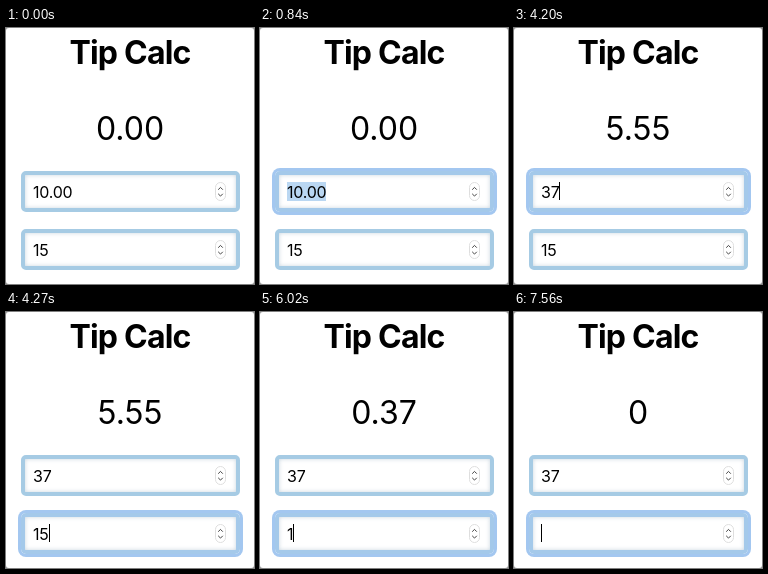
Recreate the animation shown at these times as an HTML page. Size 248 by 256 pixels, loop 8000 ms.

```html
<!DOCTYPE html>
<html lang="en">
<head>
<meta charset="utf-8">
<title>Tip Calc</title>
<style>
  html, body { margin: 0; width: 100%; height: 100%; overflow: hidden; background: #999; }
  main {
    position: relative; width: 248px; height: 256px; background: #fff; border-radius: 3px;
    font: 16px Inter, Roboto, sans-serif; font-optical-sizing: none; color: #000;
  }
  h1, output {
    position: absolute; left: 0; width: 248px; margin: 0;
    text-align: center; font-size: 32px; line-height: 40px;
  }
  h1 { top: 5px; font-weight: 700; letter-spacing: -.025em; }
  output { top: 81px; }
  .field {
    position: absolute; left: 15px; width: 219px; height: 41px; box-sizing: border-box;
    border: 4px solid #a6cbe4; border-radius: 5px; letter-spacing: -.015em;
    box-shadow: inset 0 0 4px #7897b066;
  }
  .field.focus { border-color: #a4c9ea; box-shadow: 0 0 0 3px #a3c7f0, inset 0 0 4px #7897b066; }
  .field span { position: absolute; left: 8px; top: 7px; height: 19px; line-height: 20px; white-space: pre; }
  .selected span { background: #bad7f2; }
  .caret span::after {
    content: ""; position: absolute; left: 100%; top: 0; width: 1px; height: 18px; background: #000;
  }
  svg { position: absolute; left: 190px; top: 7px; fill: none; }
</style>
</head>
<body>
<main>
  <h1>Tip Calc</h1>
  <output></output>
  <div class="field" style="top:143px"></div>
  <div class="field" style="top:201px"></div>
</main>
<script>
const LOOP = 8000;
const result = document.querySelector("output");
const fields = [...document.querySelectorAll(".field")];
for (const field of fields) {
  field.innerHTML = `<span></span>
    <svg width="11" height="19">
      <rect x=".5" y=".5" width="10" height="18" rx="5" fill="#fff" stroke="#dedede"/>
      <path d="M3.2 7.7 5.5 5.4 7.8 7.7M3.2 11.8 5.5 14.1 7.8 11.8" stroke="#444"/>
    </svg>`;
}

// start time, result, bill, tip percentage, focused field, highlight
const steps = [
  [0, "0.00", "10.00", "15", -1, ""],
  [840, "0.00", "10.00", "15", 0, "selected"],
  [3010, "0.45", "3", "15", 0, "caret"],
  [3150, "5.55", "37", "15", 0, "caret"],
  [3640, "5.55", "37", "15", 0, ""],
  [4200, "5.55", "37", "15", 0, "caret"],
  [4270, "5.55", "37", "15", 1, "caret"],
  [4410, "5.55", "37", "15", 1, "selected"],
  [6020, "0.37", "37", "1", 1, "caret"],
  [6160, "6.66", "37", "18", 1, "caret"],
  [6790, "6.66", "37", "18", 1, ""],
  [7280, "6.66", "37", "18", 1, "caret"],
  [7490, "0", "37", "", 1, "caret"],
];

let shown;
function draw() {
  const time = performance.now() % LOOP;
  const step = steps.findLast(([start]) => start <= time);
  if (step !== shown) {
    shown = step;
    const [, total, bill, tip, focus, highlight] = step;
    result.textContent = total;
    fields.forEach((field, i) => {
      field.firstChild.textContent = [bill, tip][i];
      field.className = i === focus ? `field focus ${highlight}` : "field";
    });
  }
  requestAnimationFrame(draw);
}
draw();
</script>
</body>
</html>
```
